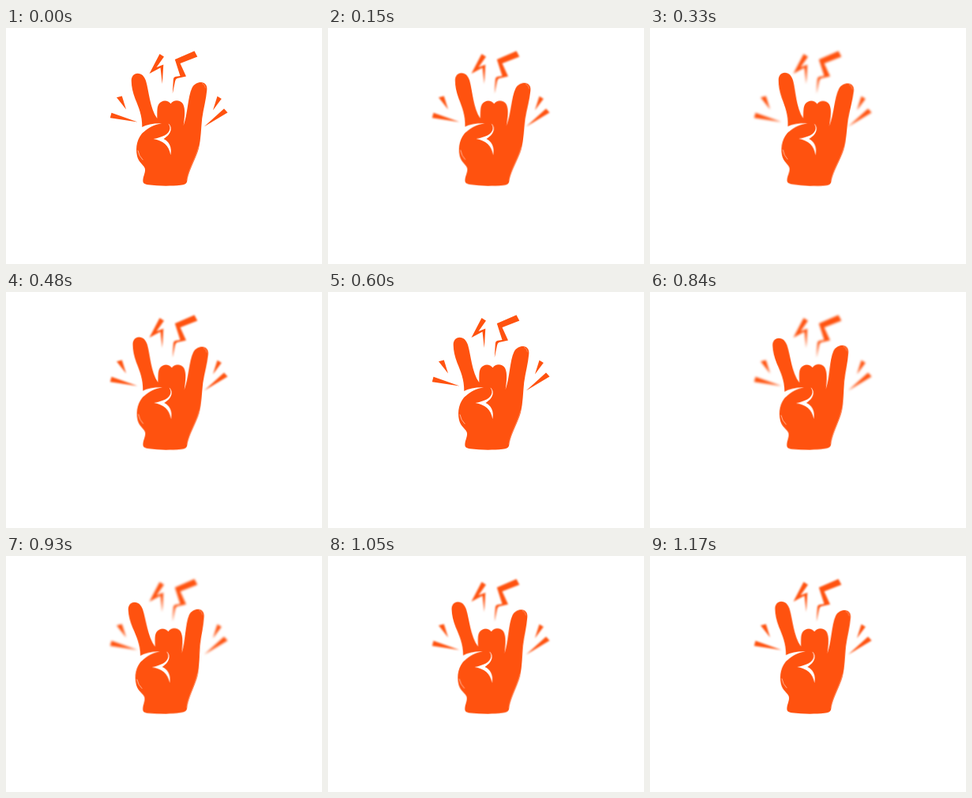
An HTML page for the animation above (1.2 s loop, 400 by 300 pixels).

```html
<!DOCTYPE html>
<html lang="en">
<head>
<meta charset="utf-8">
<title>Rock on</title>
<style>
  html, body { margin: 0; width: 100%; height: 100%; overflow: hidden; background: #fff; }
  svg { position: absolute; left: 0; top: 0; width: 400px; height: 300px; fill: #ff520f; }
  #hand { transform-origin: 200px 200px; }
  .gap { fill: #fff; }
  .shine { fill: none; stroke: #fff; stroke-width: .8; stroke-linecap: round; opacity: .7; }
  .faint { opacity: .35; }
</style>
</head>
<body>
<svg id="sparks" viewBox="0 0 400 300">
  <path d="M194.5 33 L200 36.5 L190.5 50 L199.3 46.5 L197.8 71 L195.5 50.5 L181.5 58Z"/>
  <path d="M238.5 29.3 L242.3 36.5 L220.5 45 L228 61.5 L216.5 64 Q214.5 65 214 68 L210.8 83.5 L211.8 66 Q212 62.3 215 61.8 L220.5 61 L213.8 40Z"/>
  <path d="M140 88.3 L146.8 86.5 L152 103.5Z"/>
  <path d="M133.5 107.8 L166.5 119.5 L131.8 114.2Z"/>
  <path d="M267.5 86.8 L272.8 90 L262 104.5Z"/>
  <path d="M276 102.5 L280.5 107.5 L251 125.3Z"/>
</svg>
<svg id="hand" viewBox="0 0 400 300">
  <path d="M172.3 126 C172.5 111 168 101 163.5 90 C160.5 82 158.7 74 158.7 67
    C158.7 61.5 162 57.7 166.5 57.7 C172 57.7 175 61.5 177 67 C181 80 182 102 191.3 115
    C191.5 108 190.8 101 193.2 97 C197 91 205 91 208.5 96.3
    C212 91 220 91 224 96.5 C227.5 103 226 114 224.7 124
    C230.3 108 230 88 235.5 76 C238.3 70.7 243 68.7 247.5 69 C252.5 69.7 255 73.5 254.3 79
    C253.3 91 250 102 248.2 115 C246.8 128 246.8 141 244 153 C240 167 232 179 229.3 194
    C229 198.3 226 199 221 199.8 C208 201.2 192 201 180 199.3 C175 198.5 173 197.3 173.4 193
    C173.8 188 177 183 175.8 178.5 C174.3 174 168 171 166 163 C163.5 151 166 140 174.5 131.5Z"/>
  <path class="gap" d="M171 126.5 C179 122.5 187 121 197 121.3 C188 123 181 126 174 132.5 L171 132Z"/>
  <path class="gap" d="M205.5 121.5 Q208.8 124 208.7 128 C208.5 134 204.5 137.5 199.5 141
    C206 144 210.5 151 208.3 161.5 C206.5 149 199 143.5 186.5 141 C198 139 206.5 135 207.5 128 Q207.8 124.5 205.5 121.5Z"/>
  <path class="shine" d="M167 156 Q168.3 163 173 167.5"/>
  <path class="shine faint" d="M248.5 70.5 Q252 71.5 252.5 76"/>
  <path class="shine faint" d="M243.8 151 C240 166 231.5 178 229 193"/>
</svg>
<script>
  const DURATION = 1200;
  const SWING = 1.9;
  const RISE = "cubic-bezier(.39,.575,.565,1)";
  const FALL = "cubic-bezier(.47,0,.745,.715)";

  // Each step: [time in ms, value, easing towards the next step]
  const sway = [[0, 0], [300, SWING], [600, 0], [900, -SWING], [1200, 0]];
  const haze = [[0, 0, RISE], [300, 1.5, FALL], [600, 0, RISE], [900, 1.5, FALL], [1080, .9], [1200, .82]];

  function loop(id, prop, format, steps) {
    const frames = steps.map(([time, value, easing = "linear"]) =>
      ({ offset: time / DURATION, [prop]: format(value), easing }));
    document.getElementById(id).animate(frames, { duration: DURATION, iterations: Infinity });
  }

  loop("hand", "transform", v => `rotate(${v}deg)`, sway);
  loop("sparks", "filter", v => `blur(${v}px)`, haze);
</script>
</body>
</html>
```
